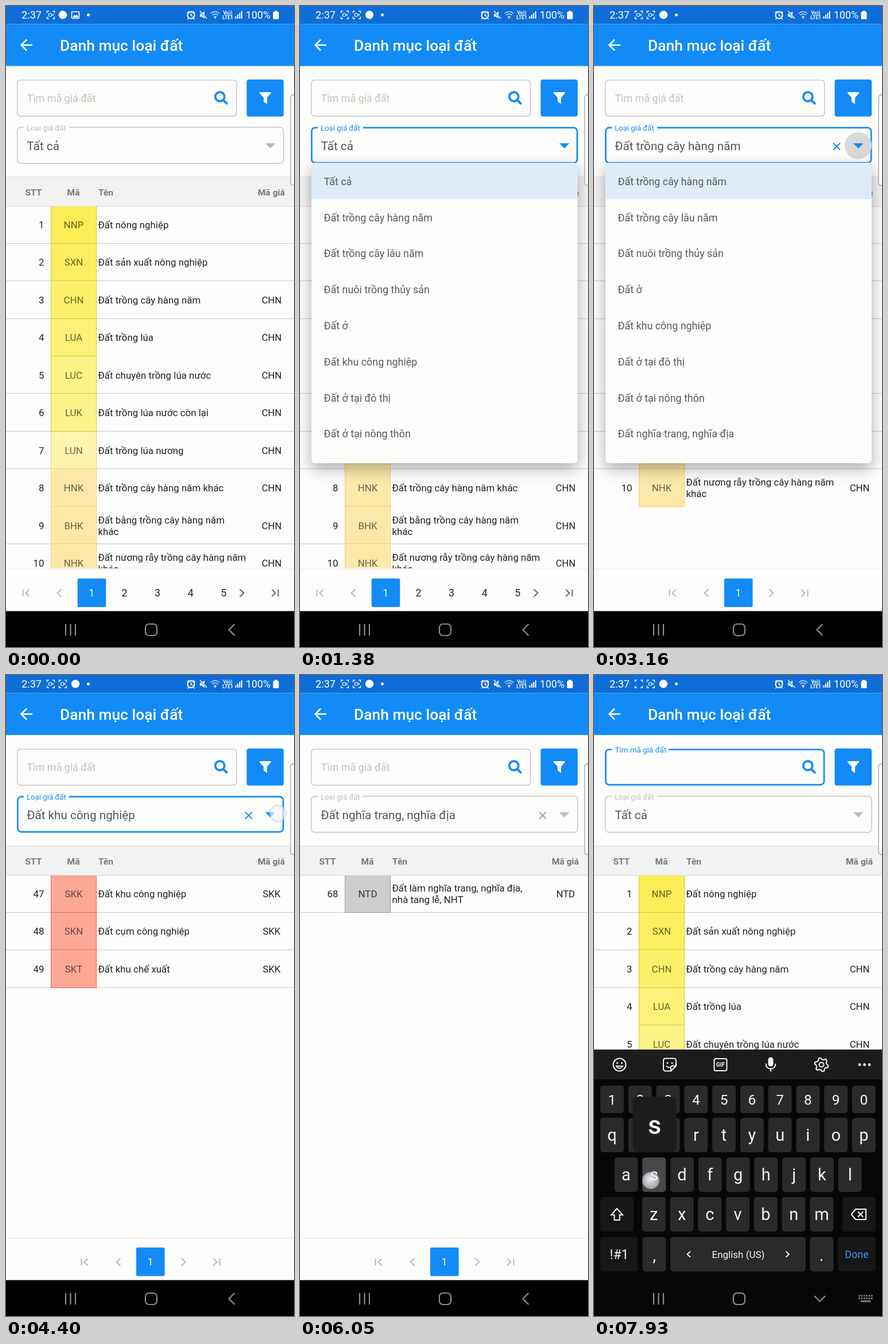
Recreate the animation shown at these times as an HTML page with a canvas. Size 502 by 1116 pixels, loop 7990 ms.

```html
<!DOCTYPE html>
<html lang="vi">
<head>
<meta charset="utf-8">
<style>
html, body { margin: 0; width: 100%; height: 100%; overflow: hidden; background: #fdfdfd; }
canvas { display: block; }
</style>
</head>
<body>
<canvas id="stage" width="502" height="1116"></canvas>
<script>
const screen2d = document.getElementById('stage').getContext('2d');
const layer = new OffscreenCanvas(502, 1116), layer2d = layer.getContext('2d');
let g = screen2d;
const LOOP = 7990, BLUE = '#128bf6', PAGE = '#fdfdfc', ROW = 65.45, ITEM = 62.8;

const ROWS = `1|NNP|Đất nông nghiệp||#fcec56
2|SXN|Đất sản xuất nông nghiệp||#fcee60
3|CHN|Đất trồng cây hàng năm|CHN|#fcf06a
4|LUA|Đất trồng lúa|CHN|#fdf277
5|LUC|Đất chuyên trồng lúa nước|CHN|#fdf386
6|LUK|Đất trồng lúa nước còn lại|CHN|#fdf38c
7|LUN|Đất trồng lúa nương|CHN|#fdf4b0
8|HNK|Đất trồng cây hàng năm khác|CHN|#fde8aa
9|BHK|Đất bằng trồng cây hàng năm/khác|CHN|#fde8aa
10|NHK|Đất nương rẫy trồng cây hàng năm/khác|CHN|#fde8aa
47|SKK|Đất khu công nghiệp|SKK|#fda897
48|SKN|Đất cụm công nghiệp|SKK|#fda897
49|SKT|Đất khu chế xuất|SKK|#fda897
68|NTD|Đất làm nghĩa trang, nghĩa địa,/nhà tang lễ, NHT|NTD|#cdcdcd`
  .split('\n').map(line => line.split('|'));
const OPTIONS = ['Tất cả', 'Đất trồng cây hàng năm', 'Đất trồng cây lâu năm', 'Đất nuôi trồng thủy sản',
  'Đất ở', 'Đất khu công nghiệp', 'Đất ở tại đô thị', 'Đất ở tại nông thôn', 'Đất nghĩa trang, nghĩa địa'];
const TABLES = { 0: [0, 10], 1: [2, 10], 5: [10, 13], 8: [13, 14] };

// [time, option] steps; the table follows the field a little later
const CHOICES = [[0, 0], [2020, 1], [3680, 5], [5230, 8], [6320, 0]];
const MENUS = [[1080, 2000], [2960, 3660], [4580, 5210]];
const RIPPLES = [2920, 4440];
const TOUCHES = [[230, 243, 740, 960], [150, 368, 1790, 1970], [462, 243, 2790, 3000], [130, 557, 3470, 3640],
  [474, 241, 4290, 4520], [150, 745, 5080, 5230], [423, 244, 6130, 6320], [251, 159, 6950, 7250], [99, 880, 7885, 8200]];

const clamp = v => Math.max(0, Math.min(1, v));
const mix = (a, b, p) => a + (b - a) * p;
const within = (t, [a, b]) => t >= a && t < b;
const choiceAt = t => CHOICES.filter(c => c[0] <= t).pop()?.[1] ?? 0;

function text(s, x, y, size, color, align = 'left', weight = 400) {
  g.font = `${weight} ${size}px Roboto, sans-serif`;
  g.textAlign = align;
  g.fillStyle = color;
  g.fillText(s, x, y + size * .355);
}
function rect(x, y, w, h, color) {
  g.fillStyle = color;
  g.fillRect(x, y, w, h);
}
function round(x, y, w, h, r, fill, stroke, lw = 1) {
  g.beginPath();
  g.roundRect(x, y, w, h, r);
  paint(fill, stroke, lw);
}
function circle(x, y, r, fill, stroke, lw = 1) {
  g.beginPath();
  g.arc(x, y, r, 0, 7);
  paint(fill, stroke, lw);
}
function paint(fill, stroke, lw) {
  if (fill) { g.fillStyle = fill; g.fill(); }
  if (stroke) { g.strokeStyle = stroke; g.lineWidth = lw; g.stroke(); }
}
function stroke(d, color, lw) {
  g.strokeStyle = color;
  g.lineWidth = lw;
  g.stroke(new Path2D(d));
}
function fill(d, color) {
  g.fillStyle = color;
  g.fill(new Path2D(d));
}
function at(x, y, scale, draw) {
  g.save();
  g.translate(x, y);
  g.scale(scale, scale);
  draw();
  g.restore();
}

function recorder(x, scale, lit) {
  at(x, 15.5, scale, () => {
    stroke('M-6.5 -3V-6.5H-3M3 -6.5H6.5V-3M6.5 3V6.5H3M-3 6.5H-6.5V3', '#fff', 1.3);
    if (lit) {
      round(-3.5, -2.5, 5, 5, 1, null, '#fff', 1.2);
      fill('M2 0L4.5 -2.2V2.2Z', '#fff');
    }
  });
}

function statusBar(t) {
  rect(0, 0, 502, 31.5, '#0e6dd7');
  text('2:37', 27, 16, 18.2, '#fff');
  const p = clamp((t - 100) / 250);
  if (p > 0) recorder(78, p, t % 1000 < 550);
  recorder(mix(78, 99, p), 1, true);
  circle(mix(99, 121, p), 15.5, 7.2, '#fff');
  if (p < 1) {
    g.globalAlpha = 1 - p;
    round(114.5, 10, 13, 11.5, 1, null, '#fff', 1.6);
    fill('M116 20L119.5 15L121.5 17.5L123.5 14.5L126.5 20Z', '#fff');
    g.globalAlpha = 1;
  }
  circle(143.5, 15.5, 2.5, '#fff');

  circle(322.5, 16, 6, null, '#fff', 2);
  stroke('M322.5 12.5V16.5L325.5 18M315.5 12L319 9M326 9L329.5 12M318 21.5L316.5 23.5M327 21.5L328.5 23.5', '#fff', 1.5);
  fill('M338 13.5H341L346 9.5V22L341 18.5H338Z', '#fff');
  stroke('M338 9L350 22', '#0e6dd7', 3);
  stroke('M338 8.5L350 22', '#fff', 1.5);
  stroke('M357 13Q364 6.5 372 13M359.5 16Q364.5 11.5 369.5 16M362 19Q364.5 17 367 19', '#c4dbf5', 1.6);
  fill('M362.5 19.5H366.5L364.5 22.5Z', '#fff');
  text('Vo))', 386.5, 11.5, 8.5, '#fff', 'center', 700);
  text('LTE1', 386.5, 20, 8.5, '#fff', 'center', 700);
  [4, 7, 10, 13].forEach((h, i) => rect(399.5 + i * 3.4, 22 - h, 2, h, '#fff'));
  text('100%', 418, 16, 17.8, '#fff');
  round(465.5, 10, 10, 13, 1.5, '#fff');
  rect(468, 8.5, 5, 2, '#fff');
}

// The outline grows inward, so its outer edge stays put
function field(y, w, label, gap, focused) {
  const lw = focused ? 2.7 : 1.2;
  round(19 + lw / 2, y + lw / 2, w - lw, 64 - lw, 6, null, focused ? BLUE : '#b9b9c2', lw);
  if (gap) rect(31, y - 2, gap, 6, PAGE);
  if (label) text(label, 36, y + 1.5, 13.2, focused ? BLUE : '#bdbdc0');
}

function filters(t) {
  const typing = t >= 7115;
  const p = 1 - (1 - clamp((t - 7115) / 200)) ** 2;
  field(128.4, 383.4, '', typing ? 99 : 0, typing);
  text('Tìm mã giá đất', 36.5, mix(160.5, 129.8, p), mix(17.9, 13.4, p), typing ? BLUE : '#c2c2bd');
  if (typing && t < 7610) rect(36.5, 147, 2.6, 29, '#f5a328');
  circle(372.8, 157.8, 8, null, BLUE, 3.7);
  stroke('M378.5 163.5L385.8 170.8', BLUE, 4);

  round(419.5, 128, 64.5, 64.5, 4, BLUE);
  fill('M443 150H461Q463 150.5 461.6 152.3L455 159.5V170.5L449 166.5V159.5L442.4 152.3Q441 150.5 443 150Z', '#fff');

  const focused = t >= 1000 && t < 5480, choice = choiceAt(t);
  field(210.5, 465.5, 'Loại giá đất', 79, focused);
  text(OPTIONS[choice], 36.5, 243.5, 20.7, '#555');
  for (const start of RIPPLES) {
    const age = t - start;
    if (age > 0 && age < 480) {
      g.globalAlpha = clamp((480 - age) / 200);
      circle(460.5, 243, 23.5 * clamp(age / 150), '#d9d9d9');
      g.globalAlpha = 1;
    }
  }
  if (choice) stroke('M417 238.5L429 250.5M429 238.5L417 250.5', focused ? BLUE : '#a5a5a5', 2);
  fill('M452 239H469.5L460.8 248Z', focused ? BLUE : '#bdbdbd');
}

function table(choice) {
  rect(0, 297, 502, 52, '#f2f2f2');
  rect(0, 297, 502, 1, '#dedee6');
  rect(0, 348.5, 502, 1, '#d5d5e2');
  const head = (s, x) => text(s, x, 324, 15.5, '#78787c', 'center', 700);
  head('STT', 48);
  head('Mã', 117.5);
  head('Tên', 174);
  head('Mã giá', 462.5);

  g.save();
  g.beginPath();
  g.rect(0, 349, 502, 630);
  g.clip();
  ROWS.slice(...TABLES[choice]).forEach(([n, code, name, price, color], i) => {
    const y = 381 + ROW * i, top = 348.7 + ROW * i, bottom = top + ROW;
    const edge = +n < 7 ? '#d6c63e' : +n < 11 ? '#f3cf70' : +n < 60 ? '#ee6450' : '#9c9c9c';
    if (i % 4 != 3) rect(0, Math.floor(bottom - 1), 502, 1, '#c9c6da');
    rect(78, top, 80, ROW, color);
    rect(78, top, 1, ROW, edge);
    rect(157, top, 1, ROW, edge);
    rect(78, Math.floor(bottom - 1), 80, 1, edge);
    text(n, 66.5, y, 16.9, '#222', 'right');
    text(code, 118, y, 16.9, `rgba(0,0,0,${n == 68 ? .75 : .58})`, 'center');
    const lines = name.split('/');
    lines.forEach((s, k) => text(s, 160.5, y + (lines.length > 1 ? k * 20 - 10 : 0), 16.9, '#222'));
    text(price, 463, y, 16.7, '#222', 'center');
  });
  g.restore();
}

function pager(choice) {
  rect(0, 980, 502, 1, '#e6e6f0');
  const all = choice == 0, box = all ? 124.7 : 227;
  const [first, prev, next, last] = all ? [35, 93, 411, 469] : [137, 196, 309, 367];
  const dim = '#b8b8b8', on = all ? '#666' : dim;
  const icon = (x, d, color) => at(x, 1022, 1, () => stroke(d, color, 2));
  icon(first, 'M-5.5 -6V6M5.5 -6L-.5 0L5.5 6', dim);
  icon(prev, 'M3.5 -6.5L-3.5 0L3.5 6.5', dim);
  icon(next, 'M-3.5 -6.5L3.5 0L-3.5 6.5', on);
  icon(last, 'M5.5 -6V6M-5.5 -6L.5 0L-5.5 6', on);
  round(box, 996.8, 49.6, 49.6, 2.5, BLUE);
  text('1', box + 24.5, 1022, 17.8, '#fff', 'center');
  if (all) [2, 3, 4, 5].forEach((n, i) => text(n, 206.5 + 57.6 * i, 1022, 17.8, '#222', 'center'));
}

function menu(t) {
  const open = MENUS.findIndex(m => within(t, m));
  if (open < 0) return;
  const scroll = open ? ITEM : 0, choice = choiceAt(t);
  g.save();
  g.shadowColor = 'rgba(0,0,0,.32)';
  g.shadowBlur = 26;
  g.shadowOffsetY = 9;
  round(20, 273, 464, 523, 6, PAGE);
  g.restore();
  g.save();
  g.beginPath();
  g.roundRect(20, 273, 464, 523, 6);
  g.clip();
  OPTIONS.forEach((s, i) => {
    const y = 305.5 + i * ITEM - scroll;
    if (y > 780) return;
    if (i == choice) rect(20, y - 32, 464, ITEM, '#dfecf8');
    text(s, 41.5, y, 17.9, '#5a5a5a');
  });
  g.restore();
}

function toolbar() {
  const w = '#f2f2f2', y = 678.5;
  at(44.5, y, 1, () => {
    circle(0, 0, 11, null, w, 2);
    circle(-4, -3, 1.6, w);
    circle(4, -3, 1.6, w);
    stroke('M-5.5 2.5Q0 10 5.5 2.5Z', w, 1.8);
  });
  at(132, y, 1, () => {
    stroke('M-7 -11H7Q11 -11 11 -7V2L2 11H-7Q-11 11 -11 7V-7Q-11 -11 -7 -11ZM11 2H5Q2 2 2 5V11M-6 2Q-3 6 1 4', w, 2);
    circle(-4, -3, 1.5, w);
    circle(4, -3, 1.5, w);
  });
  round(209.5, y - 10.5, 22, 21, 3, null, w, 2);
  text('GIF', 220.5, y, 10, w, 'center', 700);
  round(303.5, y - 13, 9, 16, 4.5, w);
  stroke(`M299.5 ${y - 2}Q300 ${y + 7} 308 ${y + 7}Q316 ${y + 7} 316.5 ${y - 2}M308 ${y + 7}V${y + 12}`, w, 2);
  at(396.5, y, 1, () => {
    g.beginPath();
    for (let i = 0; i < 24; i++) {
      const r = i % 4 < 2 ? 12 : 9, a = (i + .5) * Math.PI / 12;
      g.lineTo(r * Math.cos(a), r * Math.sin(a));
    }
    g.closePath();
    paint(null, w, 2);
    circle(0, 0, 4, null, w, 2);
  });
  [463, 471.5, 480].forEach(x => circle(x, y, 2.4, w));
}

function keys(pressed) {
  const light = '#f4f4f4', soft = '#2a2a2b', dark = '#171718';
  const key = (x, y, w, h, color) => round(x, y, w, h, 5, color);
  rect(0, 652.3, 502, 464, '#070707');
  rect(0, 652.3, 502, 51.7, '#1c1c1d');
  toolbar();
  const row = (chars, x0, y, h, size) => [...chars].forEach((c, i) => {
    const x = x0 + 48.77 * i;
    key(x - 20.5, y - h / 2, 41, h, pressed && c == 's' ? '#48484b' : soft);
    text(c, x, y, size, light, 'center');
  });
  row('1234567890', 31.5, 739, 48, 24.5);
  row('qwertyuiop', 31.5, 801, 60, 29);
  row('asdfghjkl', 56, 870, 60, 29);
  row('zxcvbnm', 104.3, 939, 60, 29);
  key(11, 909, 58, 60, dark);
  stroke('M40 929L50 940H44.5V949H35.5V940H30Z', light, 2);
  key(433, 909, 58, 60, dark);
  stroke('M456 930H474V948H456L448.5 939ZM460 934.5L469 943.5M469 934.5L460 943.5', light, 2);
  key(11, 978.5, 65, 60, dark);
  text('!#1', 44, 1008.5, 23, light, 'center');
  key(84.5, 978.5, 41, 60, soft);
  text(',', 105, 1010, 29, light, 'center');
  key(133, 978.5, 236, 60, soft);
  text('English (US)', 251.5, 1009, 17, light, 'center');
  stroke('M168 1003.5L162.5 1008.5L168 1013.5M334.5 1003.5L340 1008.5L334.5 1013.5', light, 1.8);
  key(376.5, 978.5, 41, 60, soft);
  text('.', 396.5, 1010, 29, light, 'center');
  key(425, 978.5, 66, 60, dark);
  text('Done', 458, 1009, 18, '#3f8ff0', 'center');
  if (pressed) {
    round(67.5, 734, 76, 97, 8, '#1d1d1f');
    text('s', 105.5, 783.5, 45, '#fff', 'center', 500);
  }
}

// Drawn on its own layer so that the whole keyboard fades as one sheet
function keyboard(t) {
  const p = 1 - (1 - clamp((t - 7130) / 320)) ** 3;
  if (!p) return;
  g = layer2d;
  g.clearRect(0, 0, 502, 1116);
  keys(t >= 7890);
  g = screen2d;
  g.globalAlpha = p;
  g.drawImage(layer, 0, 400 * (1 - p));
  g.globalAlpha = 1;
}

function navigation(typing) {
  const c = '#8c8c8c';
  stroke('M104 1076V1096M112.5 1076V1096M121 1076V1096', c, 2.2);
  round(243, 1076, 20, 20, 6, null, c, 2.2);
  stroke(typing ? 'M384 1081L393.5 1090.5L403 1081' : 'M398.5 1076L388.5 1086L398.5 1096', c, 2.2);
  if (!typing) return;
  for (let i = 0; i < 12; i++) rect(461 + (i % 6) * 4.4, 1079.5 + (i / 6 | 0) * 4.5, 2.6, 2.6, c);
  rect(465, 1089, 17, 2.6, c);
}

function touch(t) {
  for (const [x, y, start, end] of TOUCHES) {
    if (!within(t, [start, end])) continue;
    g.globalAlpha = Math.min(1, (end - t) / 120);
    const glow = g.createRadialGradient(x - 2, y - 3, 2, x, y, 15);
    glow.addColorStop(0, 'rgba(255,255,255,.85)');
    glow.addColorStop(.7, 'rgba(240,242,246,.65)');
    glow.addColorStop(1, 'rgba(225,228,236,.5)');
    circle(x, y, 14.5, glow, 'rgba(170,178,200,.5)', 1.2);
    g.globalAlpha = 1;
  }
}

function draw(t) {
  rect(0, 0, 502, 1116, PAGE);
  statusBar(t);
  rect(0, 31.5, 502, 73, BLUE);
  stroke('M46 68H27M36 58.5L26.5 68L36 77.5', '#fff', 2.6);
  text('Danh mục loại đất', 94, 69, 26.4, '#fff', 'left', 500);
  const shown = choiceAt(t - 140);
  table(shown);
  pager(shown);
  filters(t);
  menu(t);
  round(496, 154.5, 20, 158, 5, 'rgba(250,250,250,.9)', '#a2a2a2', 1.3);
  rect(0, 1053.5, 502, 63, '#000');
  keyboard(t);
  navigation(t >= 7130);
  touch(t);
}

const begin = performance.now();
(function tick() {
  draw((performance.now() - begin) % LOOP);
  requestAnimationFrame(tick);
})();
</script>
</body>
</html>
```
